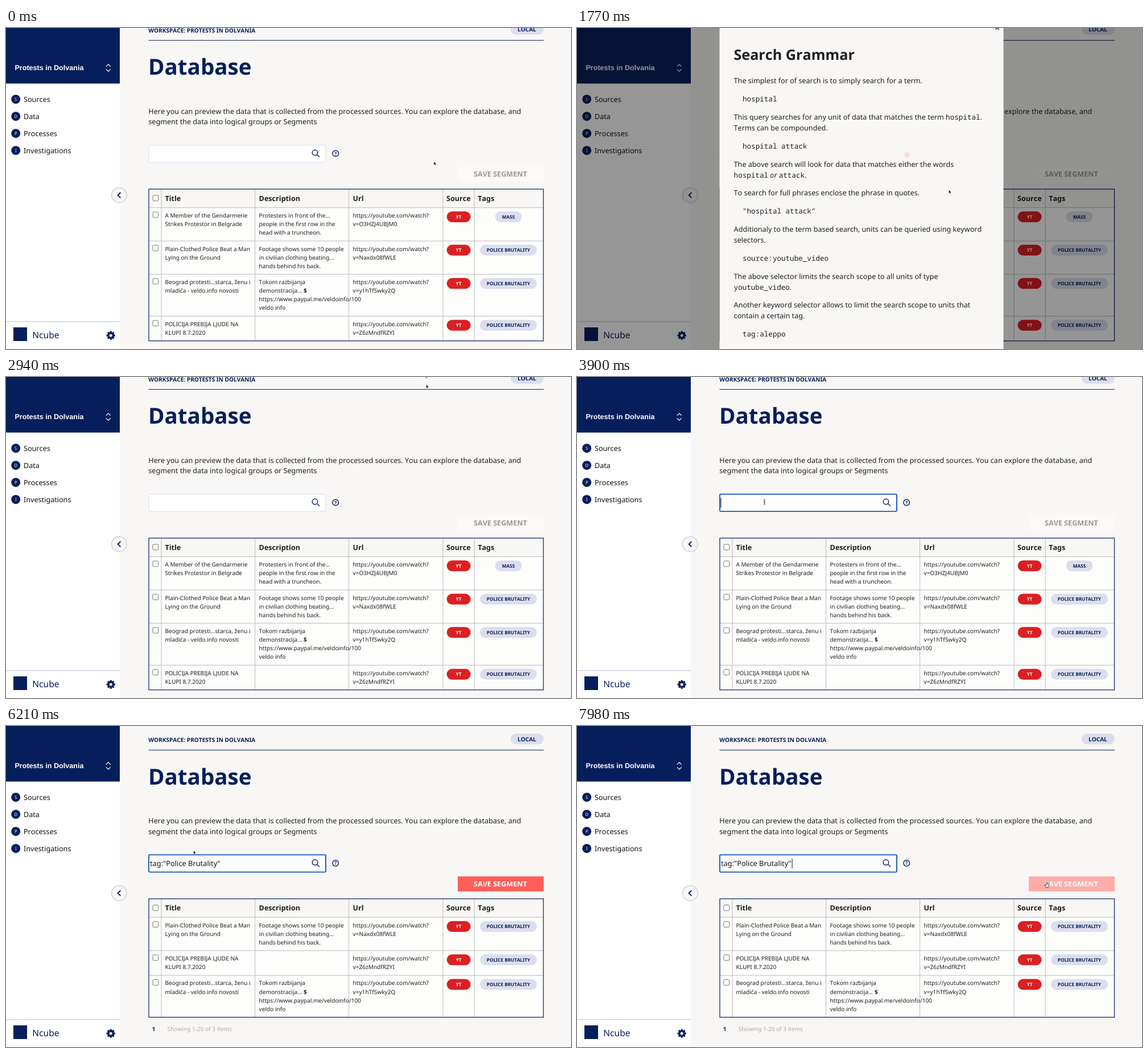
Recreate the animation shown at these times as an HTML page. Size 993 by 564 pixels, loop 8000 ms.

```html
<!DOCTYPE html>
<html lang="en">
<head>
<meta charset="utf-8">
<title>Database search</title>
<style>
html, body { margin: 0; width: 100%; height: 100%; overflow: hidden; background: #f8f7f5; }
svg { display: block; width: 993px; height: 564px; }
text { font: 12.6px "Noto Sans", sans-serif; font-kerning: none; fill: #1f1f1f; white-space: pre; text-rendering: geometricPrecision; }
.b { font-weight: 700; }
.s { font-size: 10.08px; }
.pill { font-weight: 700; font-size: 8.19px; text-anchor: middle; }
.m, .m tspan { font-family: "Noto Sans Mono", monospace; }
.n { fill: #061e5b; }
.w { fill: #fff; }
.line { fill: none; stroke: #061e5b; stroke-width: 1.4; }
</style>
</head>
<body>
<svg id="stage" viewBox="0 0 993 564"></svg>
<script>
const NAVY = '#061e5b', PAPER = '#f8f7f5', SCROLL = 20.5;
const rect = (x, y, w, h, fill, more = '') =>
  `<rect x="${x}" y="${y}" width="${w}" height="${h}" fill="${fill}" ${more}/>`;
const path = (d, more = 'class="line"') => `<path d="${d}" ${more}/>`;
const text = (x, y, s, cls = '', more = '') => `<text x="${x}" y="${y}" class="${cls}" ${more}>${s}</text>`;
const lines = (x, y, list) => list.map((s, i) => text(x, y + i * 15.1, s, 's')).join('');
const pill = (cx, cy, w, s, fill, cls) =>
  rect(cx - w / 2, cy - 9.5, w, 19, fill, 'rx="9.5"') + text(cx, cy + 3, s, 'pill ' + cls);
const check = (x, y) => rect(x - 4.9, y - 4.9, 9.8, 9.8, '#fff', 'rx="2" stroke="#77777b"');

// Table
const rows = {
  strike: [3, ['A Member of the Gendarmerie', 'Strikes Protestor in Belgrade'],
    ['Protesters in front of the...', 'people in the first row in the', 'head with a truncheon.'], 'O3HZJ4UBJM0', 'MASS'],
  plain: [3, ['Plain-Clothed Police Beat a Man', 'Lying on the Ground'],
    ['Footage shows some 10 people', 'in civilian clothing beating...', 'hands behind his back.'], 'Naxdx08fWLE'],
  news: [4, ['Beograd protesti...starca, ženu i', 'mladića - veldo.info novosti'],
    ['Tokom razbijanja', 'demonstracija... <tspan class="b">$</tspan>', 'https://www.paypal.me/veldoinfo/100', 'veldo info'], 'y1hTfSwky2Q'],
  bench: [2, ['POLICIJA PREBIJA LJUDE NA', 'KLUPI 8.7.2020'], [], 'Z6zMndfRZYI']
};
const COLS = [273, 437.6, 602.6, 768, 823.2];

function table(id, names) {
  const top = 303.6;
  let y = 336.2, cells = '', rules = '';
  for (const name of names) {
    const [n, title, about, video, tag = 'POLICE BRUTALITY'] = rows[name];
    rules += `M251 ${y}H944`;
    cells += check(262.8, y + 12.4) + lines(279.4, y + 17.3, title) + lines(444.6, y + 17.3, about) +
      lines(609.6, y + 17.3, ['https://youtube.com/watch?', 'v=' + video]) +
      pill(795.6, y + 16, 42, 'YT', '#dc1f22', 'w') +
      pill(883, y + 16, tag === 'MASS' ? 47 : 100, tag, '#dcdeec', 'n');
    y += 13.2 + n * 15.1;
  }
  rules += COLS.map(x => `M${x} ${top}V${y}`).join('');
  return `<g id="${id}">` + rect(251, top, 693.5, y - top, '#fdfdfc') + rect(251, top, 693.5, 32.6, PAPER) +
    path(rules, 'stroke="#bcbcbc" fill="none"') +
    rect(251, top, 693.5, y - top, 'none', 'stroke="#233a73" stroke-width="1.4"') + check(262.8, 319.4) +
    ['Title', 'Description', 'Url', 'Source', 'Tags'].map((s, i) =>
      text([279.4, 444.6, 609.6, 774, 829.2][i], 324.4, s, 'b')).join('') + cells + '</g>';
}

const page = '<g id="page">' +
  text(250.3, 28.2, 'WORKSPACE: PROTESTS IN DOLVANIA', 'b s n') +
  rect(887, 13.3, 58, 19, '#dcdeec', 'rx="9.5"') + text(899, 26.5, 'LOCAL', 'b s n') +
  path('M250.5 42.3H945', `stroke="${NAVY}" stroke-width="1.1"`) +
  text(250, 102.6, 'Database', 'b n', 'style="font-size:38.6px"') +
  text(250.3, 171, 'Here you can preview the data that is collected from the processed sources. You can explore the database, and') +
  text(250.3, 189.9, 'segment the data into logical groups or Segments') +
  rect(251, 226.4, 311, 30.2, '#fff', 'id="field" rx="1.5"') +
  text(253, 246.2, 'tag:"Police Brutality"', '', 'id="query" style="font-size:12.8px;fill:#111"') +
  rect(252.5, 233.2, 1, 17, '#111', 'id="caret"') +
  path('M547 243.4L551 247.2') + '<circle cx="543" cy="239.6" r="4.8" class="line"/>' +
  '<circle cx="579.2" cy="241.1" r="5.3" class="line"/>' +
  text(579.2, 244.2, '?', 'b n', 'text-anchor="middle" style="font-size:8.5px"') +
  rect(794, 264.2, 151, 26.4, '#fcf9f8', 'id="button"') + text(822, 281.9, 'SAVE SEGMENT', 'b', 'id="label"') +
  table('all', ['strike', 'plain', 'news', 'bench']) +
  '<g id="found">' + table('hits', ['plain', 'bench', 'news']) + text(256.8, 535.6, '1', 'b s n') +
  text(283.6, 535.6, 'Showing 1-20 of 3 items', 's', 'style="fill:#a9a9a9"') + '</g></g>';

// Sidebar
let gear = '';
for (let i = 0; i < 8; i++) gear += rect(182.5, 532.6, 3.4, 4, NAVY, `transform="rotate(${i * 45} 184.2 540.2)"`);
const sidebar = rect(0, 0, 200, 564, '#fff') + rect(0, 0, 200, 97.6, NAVY) +
  text(15.4, 74.3, 'Protests in Dolvania', 'b w', 'style="font-family:\'Liberation Sans\',sans-serif"') +
  path('M175.8 67.6L179.8 63.8L183.8 67.6M175.8 72.4L179.8 76.2L183.8 72.4', 'fill="none" stroke="#fff" stroke-width="1.3"') +
  ['Sources', 'Data', 'Processes', 'Investigations'].map((s, i) =>
    `<circle cx="17.2" cy="${125.2 + 30 * i}" r="8" fill="${NAVY}"/>` +
    text(17.2, 128 + 30 * i, s[0], 'w', 'text-anchor="middle" style="font-size:7.6px"') +
    text(31, 129.8 + 30 * i, s, '', 'style="fill:#111"')).join('') +
  rect(0, 515, 200, 1.6, '#d3d8e8') + rect(13, 526, 24, 24, NAVY) +
  text(46.2, 544.8, 'Ncube', 'n', 'style="font-size:15.6px"') + gear +
  `<circle cx="184.2" cy="540.2" r="4.2" fill="none" stroke="${NAVY}" stroke-width="3.4"/>` +
  '<circle cx="198.8" cy="293.7" r="13.2" fill="#f8f7f6" stroke="#d5d3d8" stroke-width="1.6"/>' +
  path('M201.4 289L196.6 293.7L201.4 298.4', 'class="line" style="stroke-width:1.9"');

// Search help
const mono = s => `<tspan class="m">${s}</tspan>`;
const help = [
  [97.4, 'The simplest for of search is to simply search for a term.'],
  [129.2, 'hospital', 1],
  [161.2, `This query searches for any unit of data that matches the term ${mono('hospital')}.`],
  [180.1, 'Terms can be compounded.'],
  [212, 'hospital attack', 1],
  [244.2, 'The above search will look for data that matches either the words'],
  [263.1, `${mono('hospital')} <tspan font-style="italic">or</tspan> ${mono('attack')}.`],
  [294.4, 'To search for full phrases enclose the phrase in quotes.'],
  [326, '"hospital attack"', 1],
  [358.2, 'Additionaly to the term based search, units can be queried using keyword'],
  [377.1, 'selectors.'],
  [408.9, 'source:youtube_video', 1],
  [441, 'The above selector limits the search scope to all units of type'],
  [459.9, mono('youtube_video') + '.'],
  [491.4, 'Another keyword selector allows to limit the search scope to units that'],
  [510.3, 'contain a certain tag.'],
  [542, 'tag:aleppo', 1]
];
const modal = '<g id="modal">' + rect(0, 0, 993, 564, '#000', 'opacity=".41"') + rect(250.5, 0, 499, 564, PAPER) +
  path('M735.6 -3.4L741.8 2.8M741.8 -3.4L735.6 2.8') +
  text(275.4, 56.2, 'Search Grammar', 'b', 'style="font-size:25.2px"') +
  help.map(([y, s, code]) => text(code ? 291 : 275.6, y, s, code ? 'm' : '')).join('') + '</g>';

const cursors = '<g id="ripple" fill="none" stroke="#f33"><circle r="1.2" fill="#f33" stroke="none"/><circle id="ring" stroke-opacity=".4"/></g>' +
  path('M0 0V6.6L1.5 5.3L2.5 7.6L3.6 7.1L2.6 4.9H4.7Z', 'id="arrow" fill="#111" stroke="#fff" stroke-width=".5"') +
  path('M-.9 .9Q0 -.7 .9 .9V3.6Q4 3.6 4.2 5.4Q4.2 8.4 2.8 9.8H-1.6L-3.8 6.2Q-3.2 4.9 -.9 6.4Z',
    'id="hand" fill="#fff" stroke="#222" stroke-width=".9"') +
  path('M-1.5 -4.5Q0 -4.5 0 -3.5Q0 -4.5 1.5 -4.5M0 -3.5V3.5M-1.5 4.5Q0 4.5 0 3.5Q0 4.5 1.5 4.5',
    'id="beam" fill="none" stroke="#333" stroke-width=".8"');

document.getElementById('stage').innerHTML = rect(0, 0, 993, 564, PAPER) + page + sidebar + modal + cursors;

// Motion
const $ = id => document.getElementById(id);
const show = (id, on) => $(id).setAttribute('display', on ? 'inline' : 'none');
const set = (id, attrs) => { for (const k in attrs) $(id).setAttribute(k, attrs[k]); };
const ramp = (t, a, b) => Math.min(1, Math.max(0, (t - a) / (b - a)));
const mix = (a, b, p) => `rgb(${a.map((v, i) => Math.round(v + (b[i] - v) * p))})`;

// time, x, y
const track = [
  [0, 752, 234.5], [810, 578.3, 218], [1450, 578.3, 218], [1770, 653.2, 284], [2010, 688, 274],
  [2350, 763, 130], [2700, 738.5, -1], [2820, 738.5, -1], [2940, 738.5, 13], [3250, 540, 125],
  [3600, 329.5, 219.5], [5999, 329.5, 219.5], [6000, 329.5, 218.5], [6450, 329.5, 218.5],
  [6850, 600, 322], [7250, 833, 281], [7380, 827, 275], [7710, 827, 275], [7980, 825.5, 273.6], [8000, 825.5, 273.6]
];
function slope(i, k) {
  const a = track[i - 1], p = track[i], b = track[i + 1];
  return !a || !b || a[1] === p[1] || b[1] === p[1] ? 0 : (b[k] - a[k]) / (b[0] - a[0]);
}
function pointer(t) {
  let i = 0;
  while (t >= track[i + 1][0]) i++;
  const a = track[i], b = track[i + 1], d = b[0] - a[0], u = (t - a[0]) / d, v = 1 - u;
  return [1, 2].map(k => v * v * (1 + 2 * u) * a[k] + u * v * v * d * slope(i, k) +
    u * u * (3 - 2 * u) * b[k] - u * u * v * d * slope(i + 1, k));
}

// time, x, y
const clicks = [[1380, 580, 223], [2820, 739, 1], [3600, 329.5, 220]];
const RED = [255, 94, 89], PINK = [254, 172, 168], PALE = [252, 249, 248];

function draw(t) {
  const searched = t >= 6000, typed = t >= 4500, focus = ramp(t, 3630, 3750);
  set('page', { transform: `translate(0 ${searched ? 0 : -SCROLL})` });
  show('all', !searched);
  show('found', searched);

  set('field', { stroke: mix([217, 220, 236], [18, 88, 186], focus), 'stroke-width': 1 + 0.9 * focus });
  show('query', typed);
  show('caret', t >= 3660 && (typed ? (t - 4470) % 1080 < 630 : t < 4260));
  set('caret', { x: typed ? 377.6 : 252.5 });

  const armed = ramp(t, 4500, 4650), hover = ramp(t, 7080, 7220);
  set('button', { fill: hover ? mix(RED, PINK, hover) : mix(PALE, RED, armed) });
  $('label').style.fill = mix([154, 152, 151], [255, 255, 255], armed);

  const veil = ramp(t, 1400, 1500) - ramp(t, 2820, 2910);
  show('modal', veil > 0);
  set('modal', { opacity: veil });

  const click = clicks.find(c => t >= c[0] && t < c[0] + 660);
  show('ripple', click);
  if (click) {
    const p = (t - click[0]) / 660;
    set('ripple', { transform: `translate(${click[1]} ${click[2]})`, opacity: 1 - p * p });
    set('ring', { r: 12 * p * p });
  }

  const kind = t >= 830 && t < 1470 || t >= 7100 ? 'hand' : t >= 3540 && t < 6000 ? 'beam' : 'arrow';
  for (const id of ['arrow', 'hand', 'beam']) show(id, id === kind);
  set(kind, { transform: `translate(${pointer(t)})` });
}

function frame(now) {
  draw(now % 8000);
  requestAnimationFrame(frame);
}
draw(0);
requestAnimationFrame(frame);
</script>
</body>
</html>
```
